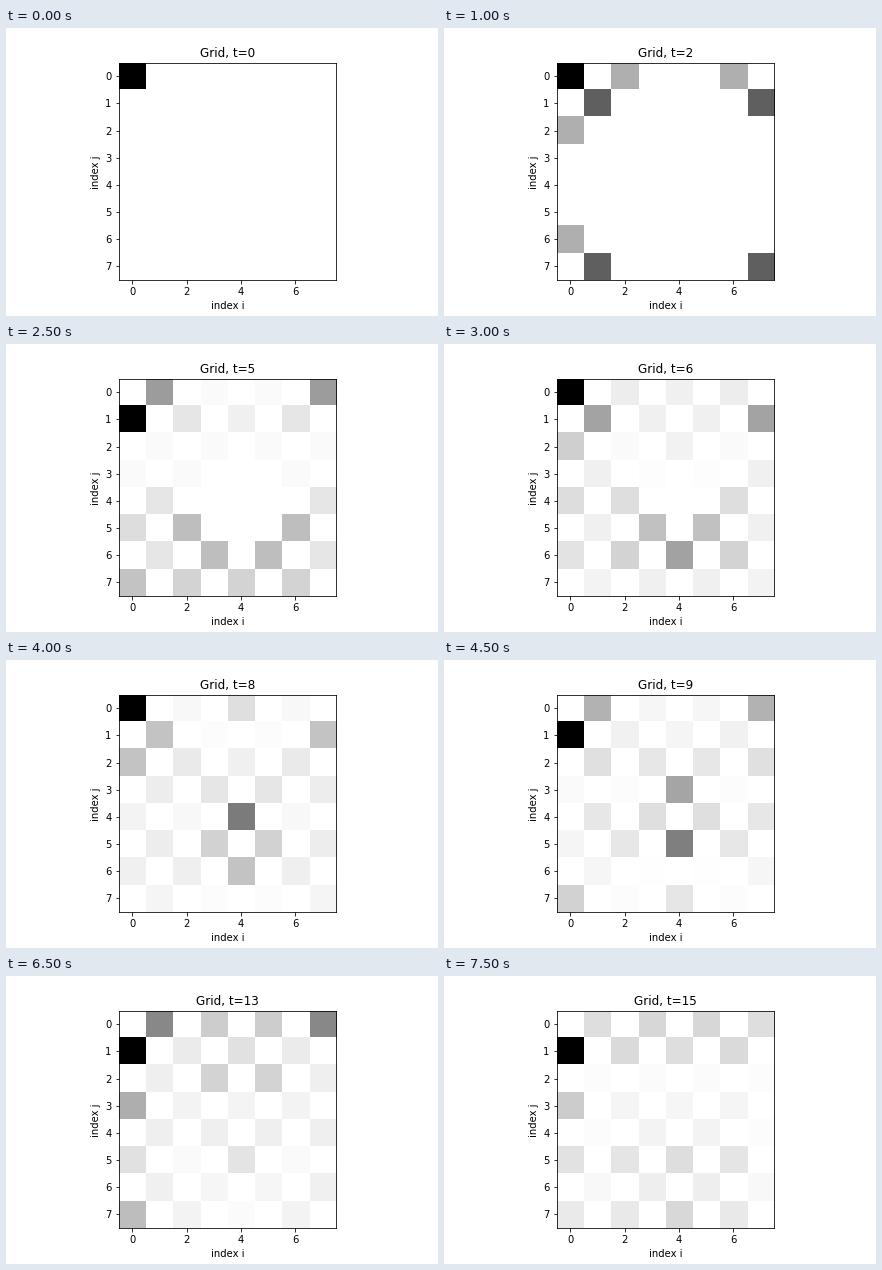
Recreate the animation shown at these times as a matplotlib script. Size 432x288 px, loop 8 s.

```python
import numpy as np
import matplotlib.pyplot as plt
from matplotlib.animation import FuncAnimation

N = 8
STEPS = 16
VMAX = 0.2
MOVES = [(0, 1), (0, -1), (-1, 0), (1, 0)]  # (dj, di): right, left, up, down


def grover_step(psi):
    """Grover coin, then a shift on the torus."""
    psi = psi.sum(axis=0) / 2 - psi
    return np.array([np.roll(p, m, axis=(0, 1)) for p, m in zip(psi, MOVES)])


def walk():
    """Probability grid at every step, starting at the origin facing up."""
    psi = np.zeros((4, N, N))
    psi[2, 0, 0] = 1
    grids = []
    for _ in range(STEPS):
        grids.append((psi ** 2).sum(axis=0))
        psi = grover_step(psi)
    return grids


plt.rcParams.update({"font.family": "DejaVu Sans", "font.size": 10})
grids = walk()

fig = plt.figure(figsize=(6, 4), dpi=72, facecolor="white")
fig.subplots_adjust(left=0.125, right=0.9, bottom=0.125, top=0.88)
ax = fig.add_subplot()
im = ax.imshow(grids[0], cmap="binary", vmin=0, vmax=VMAX,
               interpolation="nearest")
ax.set_xticks(range(0, N, 2))
ax.set_yticks(range(N))
ax.set_xlabel("index i")
ax.set_ylabel("index j", y=0.495)
title = ax.set_title("Grid, t=0")


def update(t):
    im.set_data(grids[t])
    title.set_text(f"Grid, t={t}")
    return im, title


anim = FuncAnimation(fig, update, frames=STEPS, interval=500,
                     repeat=True, repeat_delay=0, blit=False)
plt.show()
```
